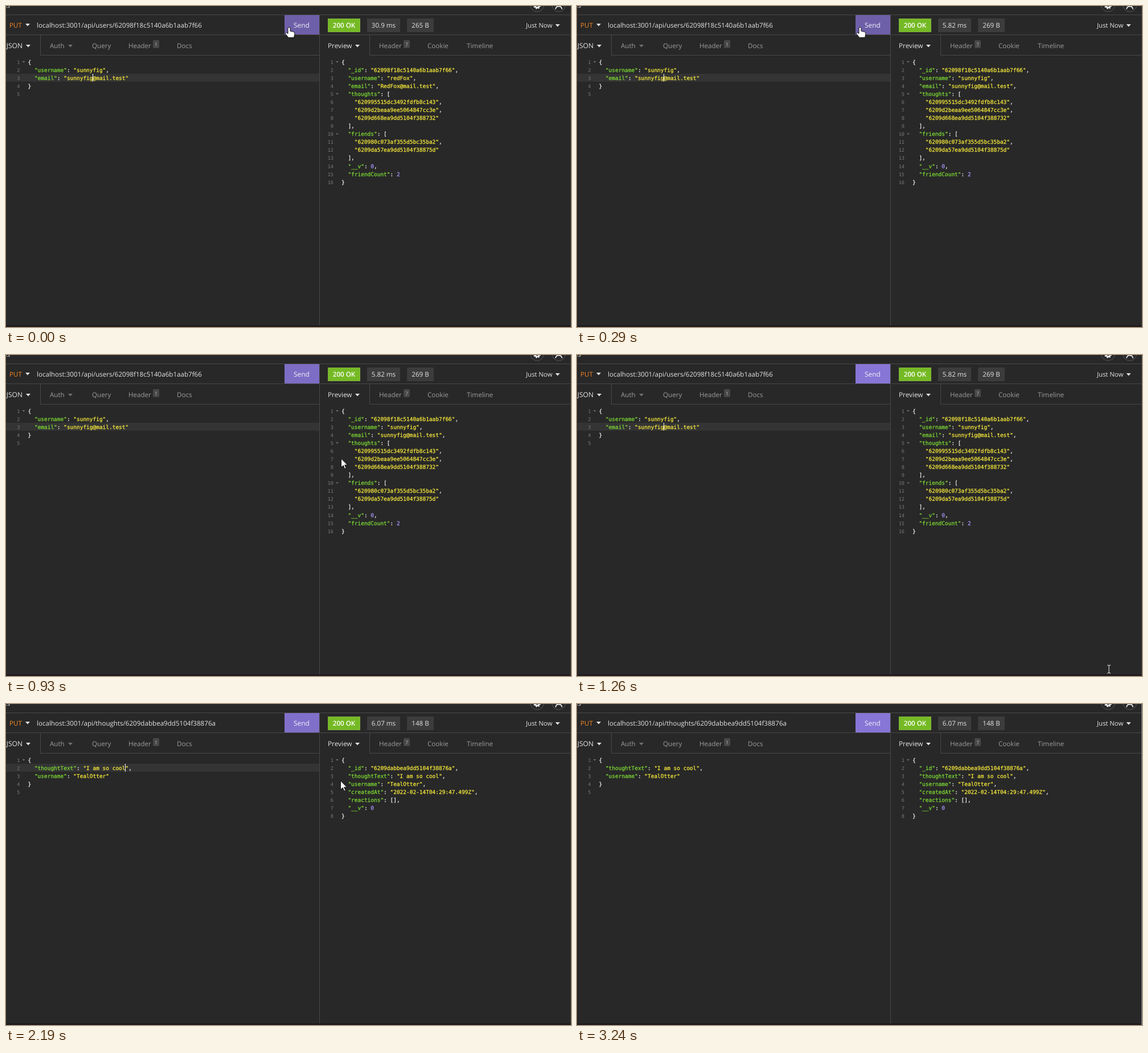
These frames come from a looping animation (992x564 px, 3300 ms). An HTML page:

```html
<!DOCTYPE html>
<html lang="en">
<head>
<meta charset="utf-8">
<title>API client</title>
<style>
  html, body { margin: 0; width: 100%; height: 100%; overflow: hidden; background: #282828; }
  svg { display: block; width: 992px; height: 564px; }
  text { font: 11.6px "Open Sans", "Noto Sans", sans-serif; fill: #e4e4e4; white-space: pre; text-rendering: geometricPrecision; }
  .code text { font: 9.47px "DejaVu Sans Mono", "Noto Sans Mono", monospace; fill: #f4f4f4; stroke: #f4f4f4; stroke-width: .25px; }
  .code .num { font-size: 8.6px; fill: #777; stroke: none; }
  .code .key { fill: #7edc35; stroke: #7edc35; }
  .code .str { fill: #f9ec3c; stroke: #f9ec3c; }
  .code .val { fill: #a896ff; stroke: #a896ff; }
</style>
</head>
<body>
<svg id="stage" viewBox="0 0 992 564"></svg>
<script>
const LOOP = 3300, CH = 5.7, ROW = 14.07;
const stage = document.getElementById('stage');

function add(parent, tag, attrs, content) {
  const node = document.createElementNS('http://www.w3.org/2000/svg', tag);
  for (const k in attrs) node.setAttribute(k, attrs[k]);
  if (content !== undefined) node.textContent = content;
  parent.appendChild(node);
  return node;
}
const group = (attrs = {}, parent = stage) => add(parent, 'g', attrs);
const rect = (x, y, width, height, fill, parent = stage) =>
  add(parent, 'rect', { x, y, width, height, fill });
const label = (x, y, str, attrs = {}, parent = stage) =>
  add(parent, 'text', { x, y, ...attrs }, str);
const arrow = (x, y, fill = '#e4e4e4', w = 4, parent = stage) =>
  add(parent, 'path', { d: `M${x - w} ${y - w / 2}h${2 * w}l${-w} ${w * 1.1}z`, fill });
const show = (node, on) => node.setAttribute('visibility', on ? 'visible' : 'hidden');

// Numbered, coloured JSON with a fold marker on each opening line
function code(x, lines, start) {
  const g = group({ class: 'code' });
  lines.forEach((line, i) => {
    const y = 101.6 + i * ROW;
    label(x - 14, y, i + 1, { class: 'num', 'text-anchor': 'end' }, g);
    if (/[{[]$/.test(line)) arrow(x - 7.5, y - 3.4, '#707070', 2.4, g);
    for (const m of line.matchAll(/("[^"]*")(?=:)|("[^"]*")|(\d+)|[^\s"\d]+/g)) {
      const cls = m[1] ? 'key' : m[2] ? 'str' : m[3] ? 'val' : '';
      label(x + m.index * CH, y, m[0], { class: cls }, g);
    }
  });
  return { g, start };
}

function userReply(name, mail) {
  return ['{', '  "_id": "62098f18c5140a6b1aab7f66",', `  "username": "${name}",`,
    `  "email": "${mail}",`, '  "thoughts": [', '    "620995515dc3492fdfb8c143",',
    '    "6209d2beaa9ee5064847cc3e",', '    "6209d668ea9dd5104f388732"', '  ],',
    '  "friends": [', '    "620980c073af355d5bc35ba2",', '    "6209da57ea9dd5104f38875d"',
    '  ],', '  "__v": 0,', '  "friendCount": 2', '}'];
}

// Window frame
rect(0, 0, 992, 564, '#282828');
const activeRow = rect(0, 119, 550, 14, '#343434');
const LINE = '#484848';
rect(0, 15, 992, 1, LINE);
rect(0, 50, 992, 1, LINE);
rect(60, 86, 490, 1, LINE);
rect(638, 86, 354, 1, LINE);
rect(60, 50, 1, 37, LINE);
rect(638, 50, 1, 37, LINE);
rect(550, 15, 1, 546, LINE);
rect(0, 561, 992, 3, '#201c1f');
const edge = rect(991, 0, 1, 564, '#3a3a3a');

// Top strip
label(7, 3, 'ns', { 'text-anchor': 'end' });
for (const cx of [932.5, 970.5])
  add(stage, 'circle', { cx, cy: -2, r: 12, fill: 'none', stroke: '#565656' });
add(stage, 'circle', { cx: 932.5, cy: -1, r: 3.8, fill: 'none', stroke: '#e4e4e4', 'stroke-width': 3 });
add(stage, 'circle', { cx: 932.5, cy: -1, r: 5.6, fill: 'none', stroke: '#e4e4e4',
  'stroke-width': 2, 'stroke-dasharray': '2.2 2.2' });
add(stage, 'path', { d: 'M965 5.5q.5-5 5.5-5q5 0 5.5 5', fill: 'none', stroke: '#e4e4e4', 'stroke-width': 1.8 });

// Request bar and tabs
label(6, 38, 'PUT', { style: 'fill:#f58624' });
arrow(38, 33);
const send = rect(489, 16, 61, 34, '#8776d5');
label(505, 38, 'Send', { style: 'fill:#f2f0fa;font-size:11.9px' });
label(29, 74, 'JSON', { 'text-anchor': 'end', style: 'font-size:12px' });
arrow(39, 70);
arrow(113, 70, '#707070');
arrow(617, 70);
arrow(968.5, 34);
label(565, 74, 'Preview', { style: 'font-size:11.8px' });
label(913, 38, 'Just Now', { style: 'font-size:11.3px' });
const tabs = { 77: 'Auth', 151: 'Query', 215: 'Header', 300: 'Docs', 655: 'Header', 740: 'Cookie', 809: 'Timeline' };
for (const x in tabs) label(x, 74, tabs[x], { style: 'fill:#9c9c9c' });
for (const [x, n] of [[263.5, 1], [703.5, 7]]) {
  add(stage, 'rect', { x: x - 5.5, y: 60, width: 11, height: 14, rx: 2, fill: '#474747' });
  label(x, 70.5, n, { 'text-anchor': 'middle', style: 'fill:#b4b4b4;font-size:9px' });
}

// Response status
add(stage, 'rect', { x: 565.5, y: 22.5, width: 56, height: 23, fill: '#75ba24', stroke: '#7fb041' });
rect(634, 22, 58, 24, '#3c3c3c');
rect(704, 22, 47, 24, '#3c3c3c');
label(593.5, 38, '200 OK', { 'text-anchor': 'middle', style: 'fill:#fff;font-weight:600' });
const timeTag = label(663, 38, '', { 'text-anchor': 'middle' });
const sizeTag = label(727.5, 38, '', { 'text-anchor': 'middle' });
const url = label(54, 37.5, '');

// Editors
const NAME = 'sunnyfig', MAIL = 'sunnyfig@mail.test';
const bodies = [
  code(38.5, ['{', `  "username": "${NAME}",`, `  "email": "${MAIL}"`, '}', ''], 0),
  code(38.5, ['{', '  "thoughtText": "I am so cool",', '  "username": "TealOtter"', '}', ''], 1890)
];
const replies = [
  code(589, userReply('redFox', 'RedFox@mail.test'), 0),
  code(589, userReply(NAME, MAIL), 40),
  code(589, ['{', '  "_id": "6209dabbea9dd5104f38876a",', '  "thoughtText": "I am so cool",',
    '  "username": "TealOtter",', '  "createdAt": "2022-02-14T04:29:47.499Z",',
    '  "reactions": [],', '  "__v": 0', '}'], 1890)
];
const tags = [['30.9 ms', '265 B'], ['5.82 ms', '269 B'], ['6.07 ms', '148 B']];
const urls = ['users/62098f18c5140a6b1aab7f66', 'thoughts/6209dabbea9dd5104f38876a'];
const caret = rect(152, 119, 1, 14, '#fff');

// Veil over the reply pane that clears after sending
const veil = rect(551, 16, 440, 545, '#1c1c1c');

// Pointers, drawn around their hot spot
const shape = (d, fill, stroke) =>
  add(stage, 'path', { d, fill, stroke, 'stroke-width': 1, 'stroke-linejoin': 'round' });
const pointers = {
  hand: shape('M-2 1.5Q0-1 2 1.5V7L7.5 8.3Q10.5 9 10 12L8.5 18.5H-1L-6 12.5Q-7.2 10 -4.8 9.6L-2 11.5Z', '#fff', '#111'),
  arrow: shape('M.5 0V15.5L4.2 12L6.8 18L9.2 17L6.6 11.2H11.5Z', '#fff', '#111'),
  beam: shape('M-3-7H-1L0-6L1-7H3M0-6V6M-3 7H-1L0 6L1 7H3', 'none', '#f0f0f0')
};

// Pointer steps: time, x, y (time alone hides it)
const moves = [
  [0, 497, 37], [670, 497, 38], [720, 496, 39], [780, 496, 40], [840, 507, 56],
  [870, 540, 108], [910, 588, 182], [950, 640, 262], [990, 688, 333], [1030, 742, 395],
  [1070, 800, 438], [1110, 845, 470], [1150, 878, 497], [1200, 905, 524],
  [1260, 934, 552], [1300, 934, 562], [1350],
  [1890, 497, 38], [2080, 508, 54], [2140, 545, 90], [2190, 587, 135], [2250, 640, 215],
  [2300, 690, 290], [2350, 738, 360], [2400, 780, 418], [2450, 818, 468],
  [2500, 850, 510], [2550, 872, 543], [2590, 884, 561], [2630]
];
const caretOn = [[0, 520], [1010, 1500], [1890, 2340], [2840, 3240]];
const blurred = [[1840, 1890], [3240, LOOP]];

const within = (t, spans) => spans.some(([a, b]) => t >= a && t < b);
const latest = (list, t, at) => list.reduce((best, item, i) => at(item) <= t ? i : best, 0);

function pointerKind(x, y) {
  if (x >= 489 && x < 550 && y >= 16 && y < 50) return 'hand';
  return y < 87 || (x > 550 && x < 590) ? 'arrow' : 'beam';
}

function sendColor(t) {
  const left = t < 1890 ? 840 : 2080;
  const hover = Math.min(1, Math.max(0, (left + 150 - t) / 150));
  const mix = (a, b) => Math.round(a + (b - a) * hover);
  return `rgb(${mix(135, 110)},${mix(118, 95)},${mix(213, 169)})`;
}

function draw(t) {
  const body = latest(bodies, t, b => b.start);
  const reply = latest(replies, t, r => r.start);
  bodies.forEach((b, i) => show(b.g, i === body));
  replies.forEach((r, i) => show(r.g, i === reply));
  url.textContent = 'localhost:3001/api/' + urls[body];
  [timeTag.textContent, sizeTag.textContent] = tags[reply];

  const focused = !within(t, blurred);
  activeRow.setAttribute('y', body ? 105 : 119);
  caret.setAttribute('y', body ? 105 : 119);
  caret.setAttribute('x', body ? 209 : 152);
  show(activeRow, focused);
  show(caret, within(t, caretOn));
  edge.setAttribute('fill', focused ? '#3a3a3a' : '#7a8993');
  send.setAttribute('fill', sendColor(t));
  veil.setAttribute('opacity', t < 40 ? 0 : Math.max(0, 0.3 * (290 - t) / 250));

  const [, x, y] = moves[latest(moves, t, m => m[0])];
  const kind = x === undefined ? '' : pointerKind(x, y);
  for (const k in pointers) show(pointers[k], k === kind);
  if (kind) pointers[kind].setAttribute('transform', `translate(${x} ${y})`);
}

const began = performance.now();
function tick() {
  draw((performance.now() - began) % LOOP);
  requestAnimationFrame(tick);
}
tick();
</script>
</body>
</html>
```
